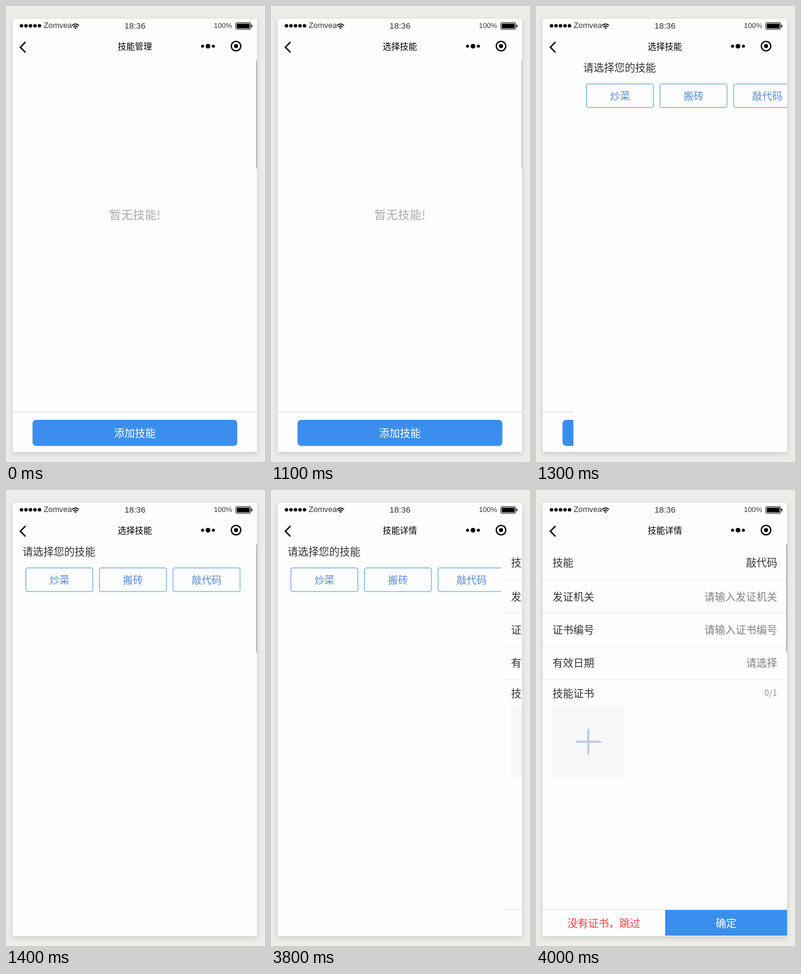
An HTML page that plays this animation: 423 px wide and 746 px high, repeating every 8 s.

```html
<!DOCTYPE html>
<html lang="zh-CN">
<head>
<meta charset="utf-8">
<title>技能管理</title>
<style>
  html, body { margin: 0; width: 100%; height: 100%; overflow: hidden; background: #ecede8; }
  svg { display: block; width: 100%; height: 100%; }
  text { font-family: "Noto Sans CJK SC", "Noto Sans CJK", sans-serif; font-size: 17px; fill: #333; }
  .status text { font-family: "Liberation Sans", Arial, sans-serif; }
  .phone { fill: #fefefe; filter: drop-shadow(0 3px 4px rgba(0, 0, 0, .14)); }
  .line { stroke: #ededed; }
  .mid { text-anchor: middle; }
  .end { text-anchor: end; }
  .hint { fill: #808080; }
  .blue { fill: #3a8eed; }
  .white { fill: #fff; }
</style>
</head>
<body>
<svg viewBox="0 0 423 746">
  <defs><clipPath id="view"><rect x="11" y="89" width="399" height="640.5"/></clipPath></defs>
  <rect class="phone" x="11" y="21" width="399" height="708.5"/>

  <g class="status">
    <g id="signal"></g>
    <text x="61.5" y="36" style="font-size:12.77px">Zomvea</text>
    <g fill="none" stroke="#000" stroke-width="1.7">
      <path d="M107.8 32Q113.5 26.6 119.2 32M110 34.3Q113.5 31 117 34.3"/>
      <path d="M111.6 35.6Q113.5 34 115.4 35.6L113.5 37.8Z" fill="#000" stroke="none"/>
    </g>
    <text class="mid" x="210.7" y="37" style="font-size:13.7px">18:36</text>
    <text x="339.6" y="36" style="font-size:11.7px">100%</text>
    <rect x="375.5" y="27.5" width="24" height="10.5" rx="1.5" fill="none" stroke="#000"/>
    <rect x="377" y="29" width="21" height="7.5" rx=".5"/>
    <rect x="400.7" y="30.5" width="1.6" height="4.5" rx=".8"/>
  </g>

  <path d="M31.8 58.8L23.4 67.4L31.8 76" fill="none" stroke="#111" stroke-width="2.4"/>
  <text id="title" class="mid" x="210.5" y="71.3" style="font-size:14px;fill:#000"></text>
  <circle cx="321" cy="65.7" r="2.5"/>
  <circle cx="329.9" cy="65.7" r="3.8"/>
  <circle cx="338.7" cy="65.7" r="2.5"/>
  <circle cx="375.7" cy="65.6" r="7.8" fill="none" stroke="#111" stroke-width="2.3"/>
  <circle cx="375.7" cy="65.6" r="3.3"/>

  <g clip-path="url(#view)">
    <g id="home">
      <text class="mid" x="210.5" y="348.7" style="font-size:19.4px;fill:#aaa">暂无技能!</text>
      <rect x="11" y="662.5" width="399" height="3.5" fill="#efefef"/>
      <rect class="blue" x="43.3" y="677" width="334.5" height="42.7" rx="6"/>
      <text class="mid white" x="210.5" y="705">添加技能</text>
    </g>
    <g id="choose">
      <rect x="11" y="89" width="399" height="641" fill="#fefefe"/>
      <text x="27" y="107.3">请选择您的技能</text>
      <g id="skills"></g>
    </g>
    <g id="detail">
      <rect x="11" y="89" width="399" height="641" fill="#fefefe"/>
      <g id="rows"></g>
      <text x="27" y="339.4">技能证书</text>
      <text class="end" x="394" y="336.6" style="font-size:14.2px;fill:#999">0/1</text>
      <rect x="27" y="353" width="117" height="118" fill="#f7f7f7"/>
      <path d="M66 411.8H105M85.5 392V431.5" stroke="#bac9df" stroke-width="3.2" stroke-linecap="round"/>
      <path d="M11 686.5H410" stroke="#e4e4e4"/>
      <text class="mid" x="110.7" y="715" style="fill:#f0413b">没有证书，跳过</text>
      <rect class="blue" x="211" y="687" width="199" height="42"/>
      <text class="mid white" x="310.5" y="715">确定</text>
    </g>
    <rect id="bar" x="409" y="89" width="1" height="177"/>
  </g>
</svg>
<script>
const LOOP = 8000, WIDTH = 399;
const $ = id => document.getElementById(id);

$("signal").innerHTML = [0, 1, 2, 3, 4]
  .map(i => `<circle cx="${25.3 + i * 7.35}" cy="32.3" r="2.85"/>`).join("");

$("skills").innerHTML = ["炒菜", "搬砖", "敲代码"].map((name, i) => {
  const x = 32.5 + i * 120.2;
  return `<rect x="${x}" y="127.5" width="109.3" height="38.6" rx="2.5" fill="none" stroke="#5496d8"/>
    <text class="mid" x="${x + 54.8}" y="153.2" style="font-size:16.4px;fill:#568ad0">${name}</text>`;
}).join("");

$("rows").innerHTML = [
  ["技能", "敲代码", 119, 147.5],
  ["发证机关", "请输入发证机关", 175, 201.5],
  ["证书编号", "请输入证书编号", 229, 255.5],
  ["有效日期", "请选择", 283, 309.5]
].map(([label, value, y, line], i) =>
  `<text x="27" y="${y + 6.4}">${label}</text>
   <text class="end ${i ? "hint" : ""}" x="394" y="${y + 6.2}">${value}</text>
   <path class="line" d="M11 ${line}H410"/>`).join("");

// Latest value whose start time has passed
const at = (steps, t) => steps.filter(([start]) => start <= t).pop()[1];

const titles = [[0, "技能管理"], [500, "选择技能"], [3600, "技能详情"]];
const chooseX = [[0, WIDTH], [1200, 233], [1300, 50], [1400, 0]];
const detailX = [[0, WIDTH], [3800, 365], [3900, 100], [4000, 0]];
const barFill = [[0, "#8c8c8c"], [1100, "#b8b8b8"], [1200, "none"], [1400, "#8c8c8c"],
  [3800, "none"], [4000, "#8c8c8c"]];

function draw(t) {
  $("title").textContent = at(titles, t);
  $("choose").setAttribute("transform", `translate(${at(chooseX, t)})`);
  $("detail").setAttribute("transform", `translate(${at(detailX, t)})`);
  $("bar").setAttribute("fill", at(barFill, t));
}

const begin = performance.now();
function tick() {
  draw((performance.now() - begin) % LOOP);
  requestAnimationFrame(tick);
}
tick();
</script>
</body>
</html>
```
